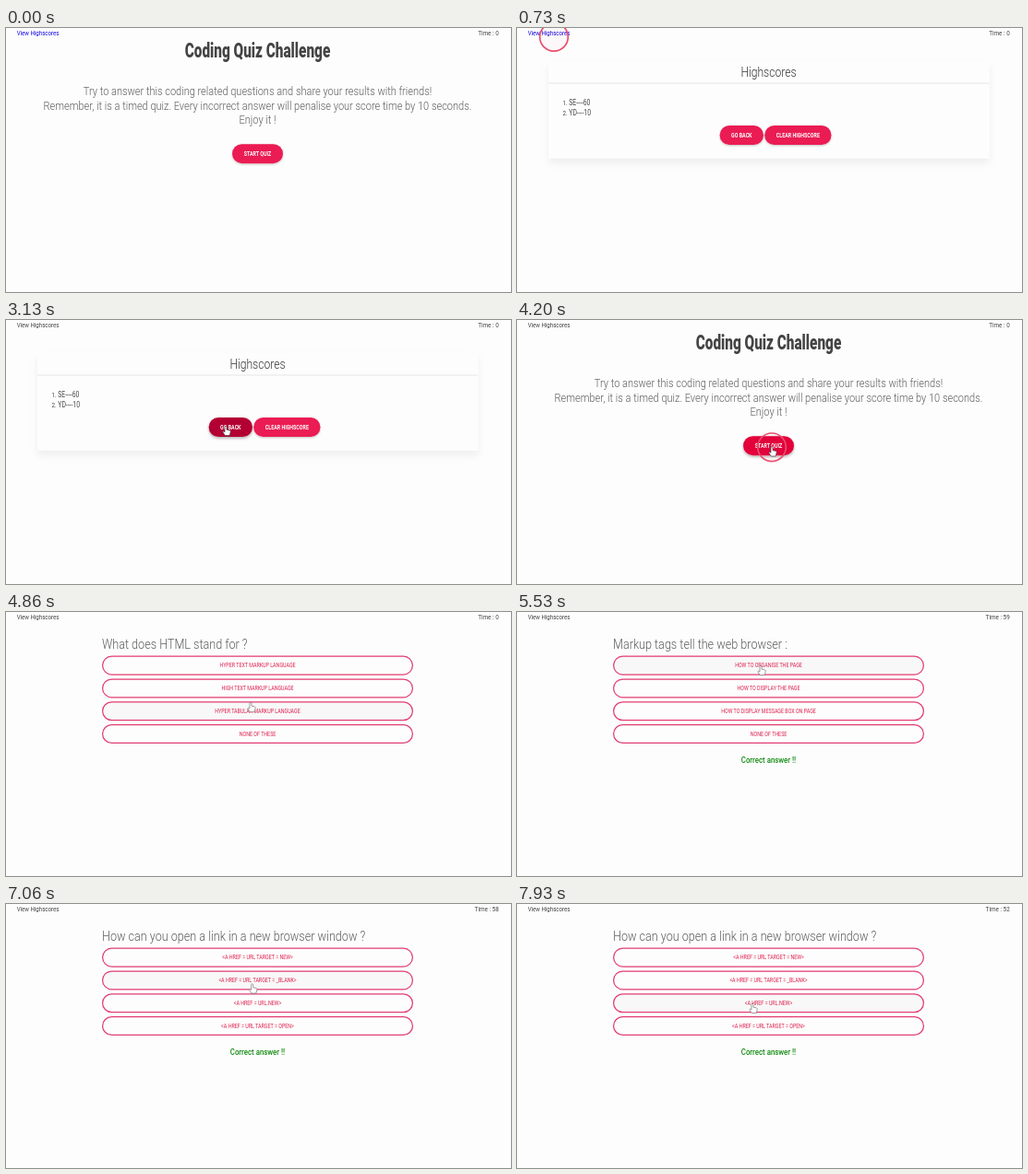
Write an HTML page that moves like this. It is 547x287 px and loops after 8 s.

```html
<!DOCTYPE html>
<html lang="en">
<head>
<meta charset="utf-8">
<title>Coding Quiz Challenge</title>
<style>
html, body { margin: 0; width: 100%; height: 100%; overflow: hidden; background: #fdfdfd; }
svg { display: block; width: 100%; height: 100%; }
text { font-family: Roboto, "Open Sans", sans-serif; white-space: pre; }
</style>
</head>
<body>
<svg id="stage" viewBox="0 0 547 287">
  <defs>
    <filter id="soft" x="-20%" y="-40%" width="140%" height="200%">
      <feDropShadow dx="0" dy="1" stdDeviation="1.1" flood-color="#000" flood-opacity=".24"/>
    </filter>
    <filter id="lift" x="-20%" y="-40%" width="140%" height="200%">
      <feDropShadow dx="0" dy="1.6" stdDeviation="1.8" flood-color="#000" flood-opacity=".3"/>
    </filter>
    <filter id="wide" x="-5%" y="-20%" width="110%" height="150%">
      <feDropShadow dx="0" dy="5" stdDeviation="4.5" flood-color="#000" flood-opacity=".06"/>
    </filter>
  </defs>
</svg>
<script>
const LOOP = 8000;
const PINK = '#ea1a52', HOVER = '#e3003a', PRESSED = '#b30030', INK = '#444', PALE = '#5c5c5c';
const stage = document.getElementById('stage');

function add(parent, tag, attrs) {
  const el = document.createElementNS('http://www.w3.org/2000/svg', tag);
  for (const k in attrs) el.setAttribute(k, attrs[k]);
  return parent.appendChild(el);
}

const group = () => add(stage, 'g', {});

// All type is set in one condensed cut; the headline is narrower.
function label(parent, str, x, y, size, { fill = INK, weight = 400, anchor = 'middle', narrow = .83 } = {}) {
  const el = add(parent, 'text', {
    transform: `translate(${x} ${y}) scale(${narrow} 1)`,
    'font-size': size, 'font-weight': weight, 'text-anchor': anchor, fill
  });
  el.textContent = str;
  return el;
}

function pill(parent, str, x, y, w) {
  const el = add(parent, 'rect', { x, y, width: w, height: 21, rx: 10.5, fill: PINK, filter: 'url(#soft)' });
  label(parent, str, x + w / 2, y + 13.2, 6.4, { fill: '#fff', weight: 700 });
  return { el, x, y, w };
}

const inside = (b, p) => p.x >= b.x && p.x <= b.x + b.w && p.y >= b.y && p.y <= b.y + 21;
const show = (el, on) => el.setAttribute('display', on ? 'inline' : 'none');

// Start page
const home = group();
label(home, 'Coding Quiz Challenge', 272.5, 31.6, 22.4, { weight: 900, narrow: .685 });
[
  'Try to answer this coding related questions and share your results with friends!',
  'Remember, it is a timed quiz. Every incorrect answer will penalise your score time by 10 seconds.',
  'Enjoy it !'
].forEach((s, i) => label(home, s, 272.5, 73.3 + 15.5 * i, 13.27, { weight: 300, fill: PALE }));
const startBtn = pill(home, 'START QUIZ', 245, 126.2, 55);

// Highscores page
const scores = group();
add(scores, 'rect', { x: 34, y: 36, width: 477.5, height: 106, rx: 1, fill: '#fdfdfd', filter: 'url(#wide)' });
add(scores, 'rect', { x: 34, y: 59.5, width: 477.5, height: 1, fill: '#e6e6e6' });
label(scores, 'Highscores', 272.5, 52.7, 14.6, { weight: 300, fill: '#333' });
['SE----60', 'YD----10'].forEach((s, i) => {
  const y = 83.5 + 11.8 * i;
  label(scores, `${i + 1}.`, 54.6, y, 7.6, { anchor: 'end' });
  label(scores, s, 56.3, y, 8.2, { anchor: 'start' });
});
const backBtn = pill(scores, 'GO BACK', 219.6, 106, 47.4);
const clearBtn = pill(scores, 'CLEAR HIGHSCORE', 268.2, 106, 72.3);

// Quiz page
const quiz = group();
const question = label(quiz, '', 104, 40.4, 15.2, { weight: 300, anchor: 'start', fill: PALE });
const options = [0, 1, 2, 3].map(i => {
  const y = 47.6 + 24.8 * i;
  const el = add(quiz, 'rect', {
    x: 104.6, y: y + .6, width: 335.8, height: 19.8, rx: 9.9, stroke: '#e23d72', 'stroke-width': 1.25
  });
  return { el, x: 104, y, w: 337, text: label(quiz, '', 272.5, y + 12.8, 6.45, { fill: '#e0204f' }) };
});
const correct = label(quiz, 'Correct answer !!', 272.5, 164.3, 9.45, { fill: '#138a13', weight: 500 });

const questions = [
  ['What does HTML stand for ?', 'HYPER TEXT MARKUP LANGUAGE', 'HIGH TEXT MARKUP LANGUAGE',
    'HYPER TABULAR MARKUP LANGUAGE', 'NONE OF THESE'],
  ['Markup tags tell the web browser :', 'HOW TO ORGANISE THE PAGE', 'HOW TO DISPLAY THE PAGE',
    'HOW TO DISPLAY MESSAGE BOX ON PAGE', 'NONE OF THESE'],
  ['How can you open a link in a new browser window ?', '<A HREF = URL TARGET = NEW>',
    '<A HREF = URL TARGET = _BLANK>', '<A HREF = URL.NEW>', '<A HREF = URL TARGET = OPEN>']
];

// Top bar and pointer
const link = label(stage, 'View Highscores', 11.7, 8.4, 7.4, { anchor: 'start' });
const clock = label(stage, '', 533.8, 8.4, 7.7, { anchor: 'end' });
const ring = add(stage, 'circle', { r: 15.3, fill: '#e8305a', 'fill-opacity': .03, stroke: '#e8506e', 'stroke-width': 1.7 });
const pointer = group();
const hand = add(pointer, 'path', {
  d: 'M-1 .8Q0-.4 1 .8V4.2L4.6 5Q5.4 5.4 5.2 6.6L4.2 10.6H-.8L-3.2 6.8Q-2.6 5.4-1 6.8Z',
  fill: '#fff', stroke: '#444', 'stroke-width': .7, 'stroke-linejoin': 'round'
});
const arrow = add(pointer, 'path', {
  d: 'M0 0V9L2 7.1 3.4 10.2 4.8 9.6 3.4 6.6H6.2Z', fill: '#fff', stroke: '#333', 'stroke-width': .7
});

// [time, x, y] of the pointer tip
const path = [
  [1730, 40, 9], [2200, 238, 115], [3660, 238, 115], [4060, 276, 137.5], [4800, 276, 137.5],
  [4860, 265, 98], [5060, 264, 58], [5600, 264, 58], [6060, 268, 110], [6400, 268, 110],
  [6600, 270, 84], [6950, 270, 84], [7200, 262, 90], [7660, 262, 90], [7920, 255, 108]
];
const clicks = [650, 2860, 4190, 5260, 6630];
const times = [[0, 0], [5330, 59], [6130, 58], [7260, 56], [7330, 54], [7400, 53], [7460, 52]];

function tipAt(t) {
  const i = path.findIndex(k => k[0] > t);
  const b = i < 0 ? path[path.length - 1] : path[i];
  const a = i > 0 ? path[i - 1] : b;
  const u = a === b ? 0 : (t - a[0]) / (b[0] - a[0]);
  const e = u * u * (3 - 2 * u);
  return { x: a[1] + (b[1] - a[1]) * e, y: a[2] + (b[2] - a[2]) * e };
}

function paintPill(btn, tip, pressed) {
  const over = inside(btn, tip);
  btn.el.setAttribute('fill', pressed ? PRESSED : over ? HOVER : PINK);
  btn.el.setAttribute('filter', over ? 'url(#lift)' : 'url(#soft)');
  return over;
}

function draw(t) {
  const page = t < 700 ? home : t < 3200 ? scores : t < 4330 ? home : quiz;
  const tip = tipAt(t);
  [home, scores, quiz].forEach(p => show(p, p === page));

  let over = false;
  if (page === home) over = paintPill(startBtn, tip, false);
  if (page === scores) {
    over = paintPill(backBtn, tip, t >= 2860);
    over = paintPill(clearBtn, tip, false) || over;
  }
  if (page === quiz) {
    const n = t < 5400 ? 0 : t < 6760 ? 1 : 2;
    question.textContent = questions[n][0];
    options.forEach((o, i) => {
      const on = inside(o, tip);
      over = over || on;
      o.el.setAttribute('fill', on ? '#f8f8f8' : '#fdfdfd');
      o.text.textContent = questions[n][i + 1];
    });
    show(correct, n > 0);
  }

  link.setAttribute('fill', t < 1730 ? '#1408e6' : INK);
  clock.textContent = 'Time : ' + times.filter(k => k[0] <= t).pop()[1];

  show(pointer, t >= 1730);
  pointer.setAttribute('transform', `translate(${tip.x} ${tip.y})`);
  hand.setAttribute('stroke', page === quiz ? '#777' : '#444');
  show(hand, over);
  show(arrow, !over);

  const hit = clicks.find(c => t >= c && t < c + 260);
  show(ring, hit !== undefined);
  if (hit !== undefined) {
    ring.setAttribute('cx', tip.x);
    ring.setAttribute('cy', tip.y + .8);
    ring.setAttribute('opacity', Math.min(1, (hit + 260 - t) / 120));
  }
}

const begin = performance.now();
function tick() {
  draw((performance.now() - begin) % LOOP);
  requestAnimationFrame(tick);
}
draw(0);
requestAnimationFrame(tick);
</script>
</body>
</html>
```
